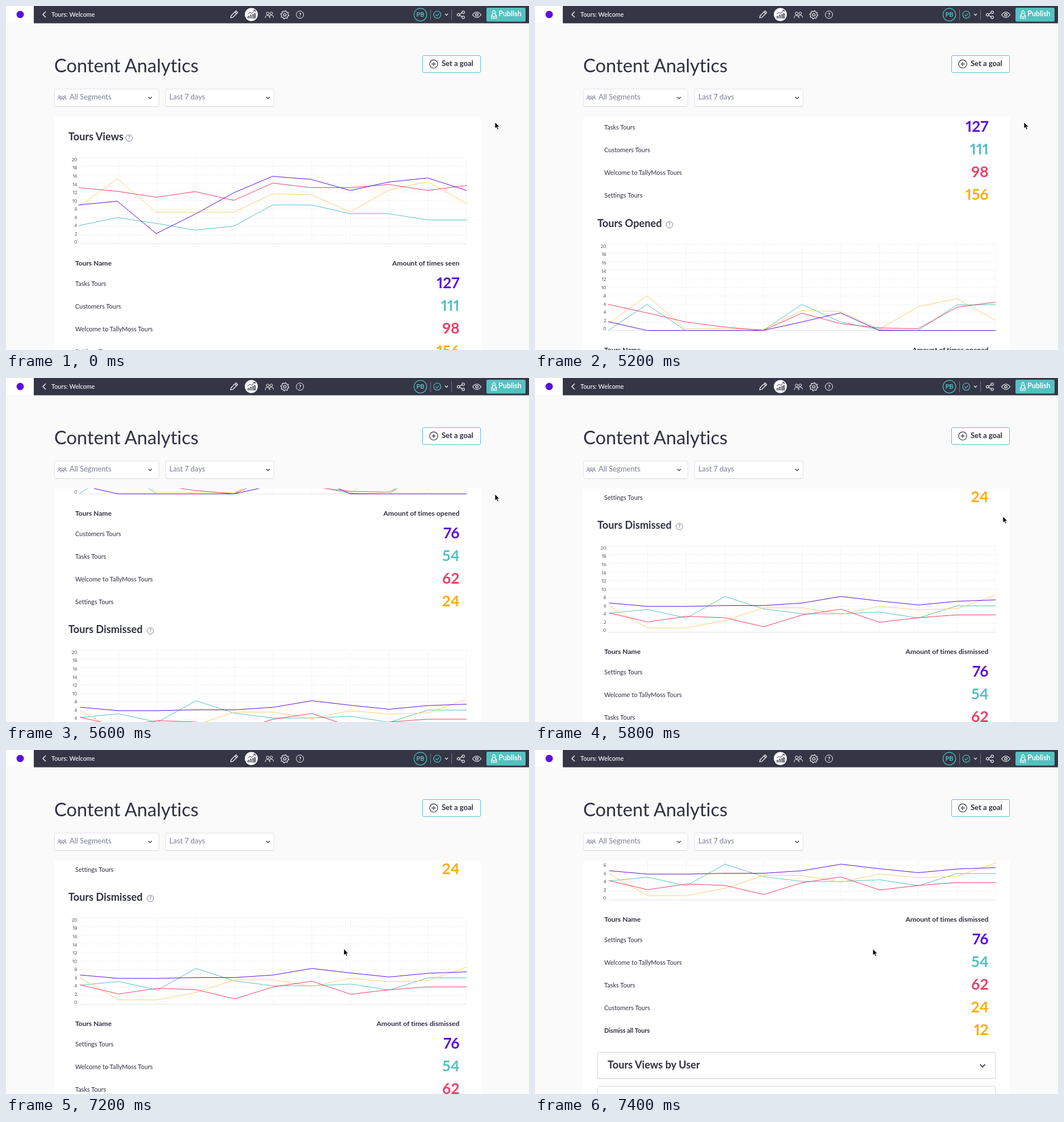
An HTML page that plays this animation: 922x607 px, repeating every 7600 ms.

```html
<!DOCTYPE html>
<html lang="en">
<head>
<meta charset="utf-8">
<title>Content Analytics</title>
<style>
  html, body { margin: 0; width: 100%; height: 100%; overflow: hidden; background: #fafafb; }
  svg { display: block; }
  text {
    font-family: Lato, "Open Sans", sans-serif; white-space: pre;
    font-variant-numeric: proportional-nums; font-variant-ligatures: none;
  }
</style>
</head>
<body>
<svg id="stage" width="100%" height="100%" viewBox="0 0 922 607"></svg>
<script>
const INK = '#2f3040', BAR = '#343545', GREY = '#7c7f95', TEAL = '#54c1c0';
const PURPLE = '#5a0fde', RED = '#ed4067', AMBER = '#ffab0c', SAND = '#fdcd6e';

const text = (x, y, s, size, fill = INK, weight = 400, anchor = 'start') =>
  `<text x="${x}" y="${y}" font-size="${size}" fill="${fill}" font-weight="${weight}" text-anchor="${anchor}">${s}</text>`;
const rect = (x, y, w, h, fill, extra = '') =>
  `<rect x="${x}" y="${y}" width="${w}" height="${h}" fill="${fill}" ${extra}/>`;
const path = (d, stroke, width = 1, extra = '') =>
  `<path d="${d}" fill="none" stroke="${stroke}" stroke-width="${width}" ${extra}/>`;
const ring = (x, y, r, stroke, width = 1, fill = 'none') =>
  `<circle cx="${x}" cy="${y}" r="${r}" fill="${fill}" stroke="${stroke}" stroke-width="${width}"/>`;
const chevron = (x, y, r, stroke, width = 1.4) =>
  path(`M${x - r} ${y - r / 2}l${r} ${r}l${r} ${-r}`, stroke, width);
const help = (x, y, r, stroke, size) =>
  ring(x, y, r, stroke, 1) + text(x, y + size * .36, '?', size, stroke, 700, 'middle');
const person = (x, y, r, stroke) =>
  ring(x, y - r, r, stroke) +
  path(`M${x - 1.7 * r} ${y + 2.4 * r}v${-.6 * r}q0 ${-1.3 * r} ${1.7 * r} ${-1.3 * r}t${1.7 * r} ${1.3 * r}v${.6 * r}`, stroke);

// Series hold heights above the chart's base line.
const sections = [
  {
    title: 'Tours Views', helpX: 217, verb: 'seen', x0: 128,
    lines: {
      teal: [32, 46, 36, 24, 31, 68.5, 68.5, 53, 53, 42, 42],
      sand: [65, 114.5, 55.5, 55.5, 55.5, 88, 86.5, 56, 95, 109.5, 71],
      red: [99, 92.5, 82, 92, 76.5, 107, 99, 99, 104.5, 94, 103],
      purple: [68.5, 75, 18, 52, 90, 119, 113.5, 94, 109, 116, 94]
    },
    rows: [['Tasks Tours', 127], ['Customers Tours', 111], ['Welcome to TallyMoss Tours', 98], ['Settings Tours', 156]]
  },
  {
    title: 'Tours Opened', helpX: 237, verb: 'opened', x0: 129,
    lines: {
      teal: [0, 46, 0, 0, 0, 46, 15, 1, 0, 45, 45.5],
      sand: [12, 61, 3, 3, 2, 35, 33.5, 2, 42, 56, 18],
      red: [46, 31, 15, 6, 0, 30.5, 12, 4.5, 3, 41, 50],
      purple: [15.5, 0, 0, 0, 0, 15, 31, 0, 0, 0, 0]
    },
    rows: [['Customers Tours', 76], ['Tasks Tours', 54], ['Welcome to TallyMoss Tours', 62], ['Settings Tours', 24]]
  },
  {
    title: 'Tours Dismissed', helpX: 254.5, verb: 'dismissed', x0: 130.5,
    lines: {
      teal: [33.5, 40, 25, 63, 41, 32.5, 32.5, 35.5, 25, 46.5, 46.5],
      sand: [46, 7.5, 7.5, 20.5, 43, 43, 31.5, 45.5, 39.5, 41.5, 65.5],
      red: [34, 18, 28, 25.5, 9.5, 30.5, 40.5, 17.5, 25.5, 30.5, 30.5],
      purple: [51.5, 45.5, 45.5, 47, 47, 51.5, 63, 55, 48, 54.5, 57]
    },
    rows: [['Settings Tours', 76], ['Welcome to TallyMoss Tours', 54], ['Tasks Tours', 62], ['Customers Tours', 24], ['Dismiss all Tours', 12]]
  }
];
const lineColor = { teal: TEAL, sand: SAND, red: RED, purple: PURPLE };
const rowColor = [PURPLE, TEAL, RED, AMBER, AMBER];

function chart({ x0, lines }) {
  let out = '';
  for (let i = 0; i <= 10; i++) {
    const y = 419.5 - 15.2 * i, x = 130.3 + 68.15 * i;
    out += path(`M130 ${y}H812`, i ? '#ebebef' : '#e2e2e7', 1, i ? 'stroke-dasharray="2 2"' : '');
    if (i) out += path(`M${x} 267V419`, '#e9e9ee', 1, 'stroke-dasharray="2 2"');
    out += text(125.5, 419.4 - 14.55 * i, 2 * i, 8, '#4b4c5a', 400, 'end');
  }
  for (const [name, values] of Object.entries(lines)) {
    const pts = values.map((v, i) => `${x0 + (812 - x0) / 10 * i} ${419.5 - v}`);
    out += path('M' + pts.join('L'), lineColor[name]);
  }
  return out;
}

function section(s, i) {
  const rows = s.rows.map(([name, n], k) => {
    const y = 39.9 * k;
    return text(122, 494 + y, name, 11, INK, k === 4 ? 700 : 400) +
      text(799.5, 498 + y, n, 26.5, rowColor[k], 700, 'end');
  }).join('');
  return `<g transform="translate(0 ${Math.ceil(428.5 * i)})">` +
    text(110, 236.5, s.title, 18.2, INK, 700) + help(s.helpX, 233, 5.8, GREY, 9) + chart(s) +
    text(122, 458, 'Tours Name', 12.1, INK, 700) +
    text(799.5, 458, 'Amount of times ' + s.verb, 12.2, INK, 700, 'end') + rows + '</g>';
}

const panel = y => rect(110, y + 1, 702, 47, '#f1f1f4', 'rx="2"') +
  rect(110.5, y + .5, 701, 46, '#fff', 'rx="2" stroke="#d3d4dc"');

const accordion = panel(1545) + text(128, 1574, 'Tours Views by User', 18.2, INK, 700) +
  chevron(789, 1569, 4.5, '#4c4d66', 2) + panel(1605);

function gear(x, y) {
  const pts = [];
  for (let i = 0; i < 32; i++) {
    const r = i % 4 < 2 ? 7.2 : 5.6, a = (i + .5) * Math.PI / 16;
    pts.push(`${x + r * Math.cos(a)} ${y + r * Math.sin(a)}`);
  }
  return path('M' + pts.join('L') + 'Z', '#fff', 1.1, 'stroke-linejoin="round"') + ring(x, y, 2.3, '#fff', 1.1);
}

const header = rect(0, 0, 49, 30, '#fff') + `<circle cx="25" cy="15" r="6.5" fill="${PURPLE}"/>` +
  rect(49, 0, 873, 30.5, BAR) +
  path('M70 10l-5 5l5 5', '#fff', 1.4) + text(80, 19, 'Tours: Welcome', 10.9, '#fff', 500) +
  path('M396 21l1-4l8.5-8.5l3 3l-8.5 8.5ZM403.5 10.5l3 3', '#fff', 1.2, 'stroke-linejoin="round"') +
  `<circle cx="432.5" cy="15" r="11.5" fill="#fff"/>` +
  path('M426.5 22v-4h2v4M430.5 22v-6h2v6M434.5 22v-7h2v7M438 22v-9h1.5v9', BAR, 1) +
  path('M426 14.5l4-3.5l3 2l6-5.5M436 7.5h3.3v3', BAR, 1) +
  person(461.3, 15.5, 2.4, '#fff') + person(467.6, 15, 2.2, '#fff') +
  gear(491.5, 15.5) + help(518.2, 15.3, 6.5, '#fff', 10) +
  ring(730.5, 15.3, 11.2, TEAL, 1.2) + text(730.5, 19.2, 'PB', 11, TEAL, 700, 'middle') +
  path('M748.5 6V25M785.5 6V25', '#777886') +
  ring(760.3, 15.3, 6.3, TEAL, 1.2) + path('M757.3 15.3l2.2 2.3l4-4.3', TEAL, 1.2) +
  chevron(776.5, 15, 2.6, '#fff', 1.2) +
  path('M798 15.5l7.5-4.5M798 15.5l7.5 4.5', '#fff', 1.1) +
  ring(797.7, 15.5, 2.2, '#fff', 1.1, BAR) + ring(806, 11, 2.2, '#fff', 1.1, BAR) + ring(806, 20, 2.2, '#fff', 1.1, BAR) +
  path('M822.5 15.5q7.5-9.5 15 0q-7.5 9.5-15 0Z', '#fff', 1.2) + ring(830, 15.5, 2.2, '#fff', 1.2) +
  rect(847, 3, 69, 24.5, TEAL, 'rx="2.5"') +
  path('M857.5 19v-7q.5-3 2.7-4.5q2.2 1.5 2.7 4.5v7ZM857.5 15l-1.7 2v5h8.8v-5l-1.7-2M860.2 19v3', '#fff', 1.1) +
  ring(860.2, 13, 1, '#fff', .9) + text(868.3, 18.2, 'Publish', 12.4, '#fff', 700);

const select = (x, w) => rect(x + .5, 146.5, w, 31, '#fff', 'rx="2.5" stroke="#e3e4e9"') +
  path(`M${x + 2} 177.5h${w - 3}`, '#d5d6de');

const toolbar = text(85, 116.5, 'Content Analytics', 32.7) +
  rect(734.5, 87.5, 102, 30, '#fff', `rx="2" stroke="${TEAL}"`) +
  ring(754, 102.3, 7.2, INK, 1.2) + path('M750.5 102.3h7M754 98.8v7', INK, 1.2) +
  text(768, 105.8, 'Set a goal', 13, INK, 700) +
  select(85, 184) + select(281, 191) +
  person(94, 161.5, 1.6, GREY) + person(104, 161.5, 1.6, GREY) + person(99, 162.3, 1.8, GREY) +
  text(112, 165.3, 'All Segments', 13, GREY) + chevron(254, 162, 3, '#44455a') +
  text(288, 165.3, 'Last 7 days', 13.1, GREY) + chevron(462, 162, 3, '#44455a');

const tip = [['12 Jan 24', 12, PURPLE], ['2 Jan 24', 8, SAND], ['2 Jan 24', 5, TEAL], ['2 Jan 24', 5, RED]]
  .map(([date, n, color], i) => {
    const y = 24.5 * i;
    return rect(580, 297 + y, 1.7, 21.5, color) + text(586, 304.5 + y, date, 8.8, '#fff', 700) +
      text(586, 315.3 + y, `<tspan font-weight="700" fill="#fff">${n}</tspan> Tours dismissed`, 9.1, i ? '#a3a4aa' : '#e2e2e6');
  }).join('');

const hover = path('M142.5 62V95', '#e6e6ea') + path('M675.5 295V448', '#5b5c66') +
  rect(577, 295, 88, 100, '#171922', 'rx="1"') + tip +
  `<circle cx="675.5" cy="401" r="4.5" fill="${PURPLE}" opacity=".2"/><circle cx="675.5" cy="401" r="3" fill="${PURPLE}"/>`;

document.getElementById('stage').innerHTML =
  rect(0, 0, 922, 607, '#fafafb') + rect(85, 195, 752, 420, '#fff', 'rx="3"') +
  `<svg y="195" width="922" height="412" viewBox="0 195 922 412" overflow="hidden"><g id="content">
    ${sections.map(section).join('')}${accordion}</g></svg>` +
  header + toolbar + `<g id="hover">${hover}</g>` +
  `<path id="cursor" d="M0 0V11.2L2.6 8.9L4.4 12.9L6.3 12L4.5 8.1H8Z" fill="#000" stroke="#fff" stroke-width=".8"/>`;

const [content, hoverLayer, cursor] = ['content', 'hover', 'cursor'].map(id => document.getElementById(id));
const clamp = (v, lo, hi) => Math.max(lo, Math.min(hi, v));

function draw(now) {
  const step = Math.floor(now % 7600 / 100);
  const scroll = 92 * (clamp(step - 49, 0, 9) + clamp(step - 72, 0, 2));
  const p = clamp((step - 57) / 5, 0, 1);
  const [x, y] = step < 72 ? [862 - 186 * p, 205 + 196 * p] : [595.5, 351];
  content.setAttribute('transform', `translate(0 ${-scroll})`);
  cursor.setAttribute('transform', `translate(${x} ${y})`);
  hoverLayer.setAttribute('visibility', step >= 62 && step < 72 ? 'visible' : 'hidden');
}

let start;
function tick(now) {
  start ??= now;
  draw(now - start);
  requestAnimationFrame(tick);
}
draw(0);
requestAnimationFrame(tick);
</script>
</body>
</html>
```
